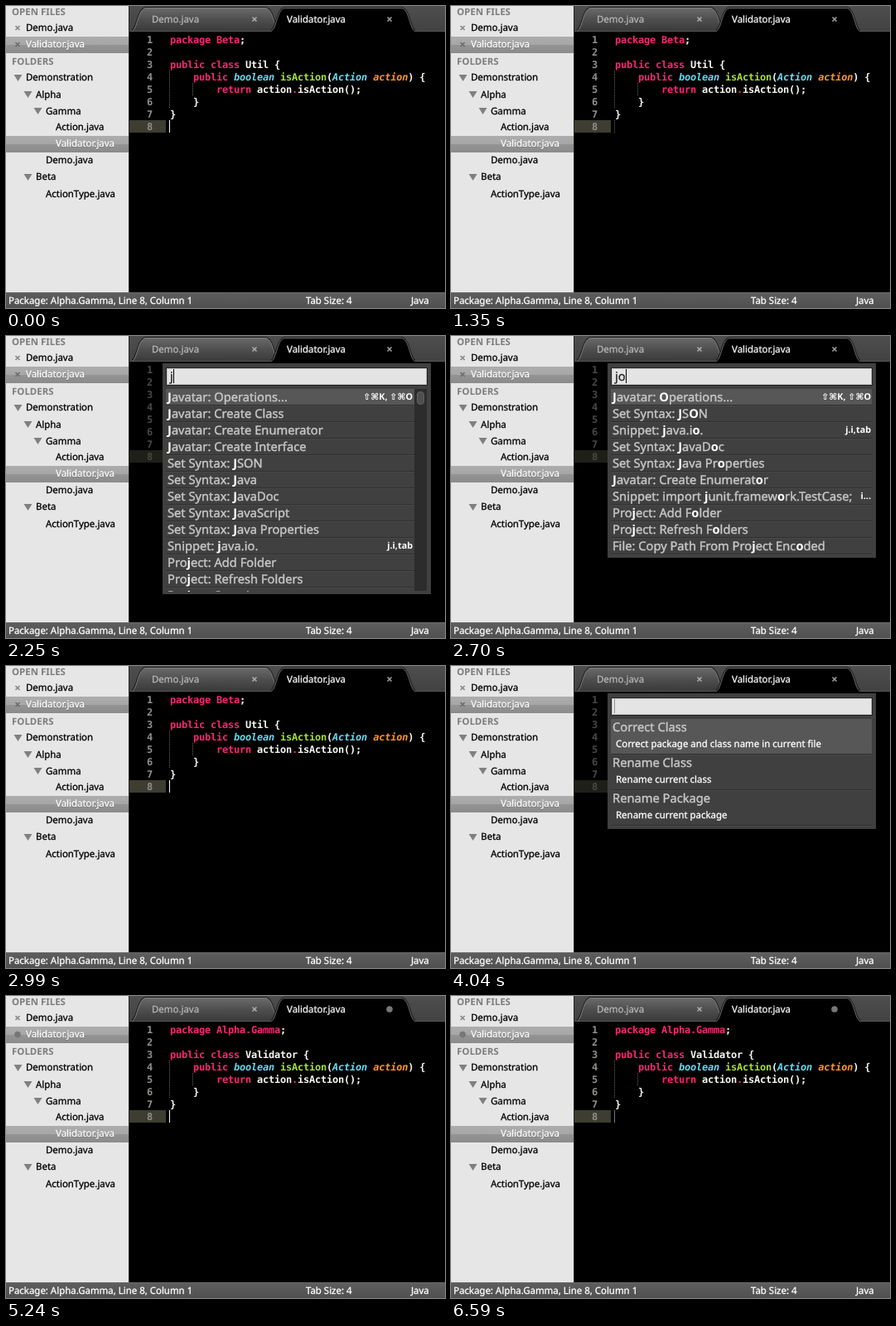
An HTML page that plays this animation: 530 by 365 pixels, repeating every 6.69 s.

```html
<!DOCTYPE html>
<html lang="en">
<head>
<meta charset="utf-8">
<title>Editor demo</title>
<style>
html, body { margin: 0; width: 100%; height: 100%; overflow: hidden; background: #000; }
svg { display: block; width: 530px; height: 365px; }
text { font-family: "Noto Sans", "DejaVu Sans", sans-serif; font-size: 11.45px; white-space: pre; text-rendering: geometricPrecision; stroke-width: .3px; }
.head { font-weight: bold; fill: #7d7d7d; }
.code, .num { font-family: "DejaVu Sans Mono", monospace; font-size: 12px; font-weight: bold; letter-spacing: -.224px; }
.code { fill: #f8f8f2; }
.k { fill: #f92672; }
.t { fill: #66d9ef; font-style: italic; }
.f { fill: #a6e22e; }
.a { fill: #fd971f; font-style: italic; }
.item { font-size: 14.7px; fill: #c8c8c8; stroke: #c8c8c8; stroke-width: .4px; }
.item .hit { font-weight: bold; fill: #fff; stroke: none; }
.keys { font-size: 10.8px; font-weight: bold; fill: #fff; text-anchor: end; }
.typed { font-size: 14.7px; fill: #222; stroke: #222; }
</style>
</head>
<body>
<svg id="stage" viewBox="0 0 530 365" xmlns="http://www.w3.org/2000/svg">
  <defs>
    <linearGradient id="bar" x2="0" y2="1"><stop stop-color="#4e4e4e"/><stop offset="1" stop-color="#424242"/></linearGradient>
    <linearGradient id="idle" x2="0" y2="1"><stop stop-color="#6a6a6a"/><stop offset=".5" stop-color="#4e4e4e"/><stop offset="1" stop-color="#3a3a3a"/></linearGradient>
    <linearGradient id="sel" x2="0" y2="1"><stop stop-color="#adadad"/><stop offset=".5" stop-color="#a6a6a6"/><stop offset=".5" stop-color="#949494"/><stop offset="1" stop-color="#8b8b8b"/></linearGradient>
    <linearGradient id="foot" x2="0" y2="1"><stop stop-color="#5e5e5e"/><stop offset="1" stop-color="#505050"/></linearGradient>
    <clipPath id="list"><rect x="193" y="64" width="315" height="245"/></clipPath>
  </defs>
  <g id="frame"></g>
  <g id="view"></g>
  <rect id="caret" width="1"/>
</svg>
<script>
const LOOP = 6690, DIM = .35;
// start time, scene, caret opacity
const STEPS = [
  [0, "before", 1], [300, "before", DIM], [450, "before", 0], [900, "before", DIM],
  [1050, "before", 1], [1200, "before", DIM], [1350, "before", 0],
  [1800, "all", 1], [2250, "j", 1], [2700, "jo", 1], [2990, "before", 1],
  [3140, "ops", 1], [3440, "ops", DIM], [3590, "ops", 0], [4040, "ops", DIM],
  [4190, "after", 1], [4640, "after", 0], [5240, "after", 1], [5540, "after", DIM],
  [5690, "after", 0], [6140, "after", DIM], [6290, "after", 1], [6590, "after", DIM]
];

const LISTS = {
  all: ["About", "Bookmarks: Clear All|⇧⌘F2", "Bookmarks: Select All", "Bookmarks: Select Next|F2",
    "Bookmarks: Select Previous|⇧F2", "Bookmarks: Toggle|⌘F2", "Build: Build|⌘B", "Build: Cancel|⌃C",
    "Code Folding: Fold Tag Attributes|⌘K, ⌘T", "Code Folding: Unfold All|⌘K, ⌘J",
    "Convert Case: Lower Case|⌘K, ⌘L", "Convert Case: Swap Case", "Convert Case: Title Case"],
  j: ["Javatar: Operations...|⇧⌘K, ⇧⌘O", "Javatar: Create Class", "Javatar: Create Enumerator",
    "Javatar: Create Interface", "Set Syntax: JSON", "Set Syntax: Java", "Set Syntax: JavaDoc",
    "Set Syntax: JavaScript", "Set Syntax: Java Properties", "Snippet: java.io.|j.i,tab",
    "Project: Add Folder", "Project: Refresh Folders", "Project: Save As"],
  jo: ["Javatar: Operations...|⇧⌘K, ⇧⌘O", "Set Syntax: JSON", "Snippet: java.io.|j.i,tab",
    "Set Syntax: JavaDoc", "Set Syntax: Java Properties", "Javatar: Create Enumerator",
    "Snippet: import junit.framework.TestCase;|i...", "Project: Add Folder",
    "Project: Refresh Folders", "File: Copy Path From Project Encoded"]
};
const OPS = [
  ["Correct Class", "Correct package and class name in current file"],
  ["Rename Class", "Rename current class"],
  ["Rename Package", "Rename current package"]
];

const $ = id => document.getElementById(id);
const text = (x, y, s, attr = "") => `<text x="${x}" y="${y}" ${attr}>${s}</text>`;
const label = (x, y, s, color) => text(x, y, s, `fill="${color}" stroke="${color}"`);
const rect = (x, y, w, h, fill, attr = "") =>
  `<rect x="${x}" y="${y}" width="${w}" height="${h}" fill="${fill}" ${attr}/>`;
const span = (cls, s) => `<tspan class="${cls}">${s}</tspan>`;
const cross = (x, y, color) =>
  `<path d="M${x - 2.5} ${y - 2.5}l5 5m0-5l-5 5" stroke="${color}" stroke-width="1.7"/>`;
const dot = (x, y, color) => `<circle cx="${x}" cy="${y}" r="3.8" fill="${color}"/>`;
const arrow = (x, y) => `<path d="M${x} ${y}h10l-5 8z" fill="#808080"/>`;

function tab(x, end, fill, edge) {
  const d = `M${x} 30.5C${x + 7} 28 ${x + 7} 3 ${x + 17} 2.5H${end - 17}C${end - 7} 3 ${end - 7} 28 ${end} 30.5`;
  return `<path d="${d}" fill="none" stroke="#1c1c1c" stroke-width="3"/>` +
    `<path d="${d}" fill="${fill}" stroke="${edge}"/>`;
}

function chrome() {
  const entry = (x, y, s) => label(x, y, s, "#000");
  const chosen = (x, y) => rect(0, y, 148, 20, "url(#sel)") +
    text(x, y + 14, "Validator.java", 'fill="#666"') + label(x, y + 13, "Validator.java", "#fff");
  return rect(0, 0, 530, 365, "#000") +
    rect(149, 0, 381, 30, "url(#bar)") +
    tab(152, 330, "url(#idle)", "#808080") + rect(149, 30, 381, 1, "#555") +
    tab(320, 494, "#000", "#6c6c6c") + rect(321, 30, 172, 3, "#000") +
    label(176, 20, "Demo.java", "#b4b4b4") + cross(300, 16, "#aaa") +
    label(339, 20, "Validator.java", "#f4f4f4") +
    rect(0, 0, 148, 346, "#e6e6e6") + rect(148, 0, 1, 346, "#222") +
    text(7, 11, "OPEN FILES", 'class="head"') + cross(14, 26.5, "#888") + entry(24, 30, "Demo.java") +
    chosen(24, 37) + text(7, 71, "FOLDERS", 'class="head"') +
    arrow(9.5, 83) + entry(24, 90, "Demonstration") +
    arrow(21.5, 103) + entry(36, 111, "Alpha") +
    arrow(33.5, 123) + entry(48, 131, "Gamma") +
    entry(60, 150, "Action.java") + chosen(60, 157) + entry(48, 190, "Demo.java") +
    arrow(21.5, 203) + entry(36, 210, "Beta") + entry(48, 231, "ActionType.java") +
    rect(0, 346, 530, 19, "url(#foot)") + rect(0, 346, 530, 1, "#6a6a6a") +
    label(3, 360, "Package: Alpha.Gamma, Line 8, Column 1", "#fff") +
    label(362, 360, "Tab Size: 4", "#fff") + label(489, 360, "Java", "#fff");
}

function gutter(dim) {
  let out = rect(149, 138, 44, 15, dim ? "#1f1f19" : "#3e3d32");
  for (let i = 1; i <= 8; i++)
    out += text(170, 30 + 15 * i, i, `class="num" fill="${dim ? "#484845" : "#8f908a"}"`);
  return out;
}

function code(pack, name) {
  const k = s => span("k", s);
  const lines = [
    k("package " + pack) + ";", "",
    k("public class") + ` ${name} {`,
    `    ${k("public")} ${span("t", "boolean")} ${span("f", "isAction")}(${span("t", "Action")} ${span("a", "action")}) {`,
    `        ${k("return")} action${k(".")}isAction();`,
    "    }", "}"
  ];
  const guide = (x, y, end) =>
    `<path d="M${x} ${y}V${end}" stroke="#666" stroke-dasharray="1 1"/>`;
  return gutter(false) + guide(197.5, 78, 123) + guide(225.5, 93, 108) + guide(197.5, 138, 153) +
    lines.map((s, i) => text(198, 45 + 15 * i, s, 'class="code"')).join("");
}

// Highlights the first in-order match of each typed letter.
function mark(s, query) {
  let n = 0;
  return [...s].map(c =>
    n < query.length && c.toLowerCase() === query[n] ? (n++, span("hit", c)) : c).join("");
}

function panel(height, query) {
  return gutter(true) + rect(189, 33, 324, height, "#404040") +
    rect(193.5, 38.5, 315, 21, "#e4e4e4", 'stroke="#222"') +
    rect(194.5, 39.5, 313, 19, "none", 'stroke="#c4c4c4"') +
    text(198, 54, query, 'class="typed" id="typed"');
}

function rule(y, w) {
  return rect(193, y, w, 1, "#303030") + rect(193, y + 1, w, 1, "#484848");
}

function palette(key) {
  const query = key === "all" ? "" : key, items = LISTS[key], long = items.length > 12;
  const w = long ? 300 : 315;
  let rows = rect(193, 64, w, 20, "#575757");
  items.forEach((item, i) => {
    const [title, keys] = item.split("|"), y = 64 + 20 * i;
    rows += rule(y + 19, w) + text(195, y + 15, mark(title, query), 'class="item"');
    if (keys) rows += text(long ? 491 : 507, y + 13, keys, 'class="keys"');
  });
  if (long) rows += rect(493, 64, 15, 244, "#2c2c2c") +
    rect(496.5, 67.5, 8, 15, "#4e4e4e", 'rx="3.5" stroke="#626262"');
  return panel(long ? 279 : 235, query) + `<g clip-path="url(#list)">${rows}</g>`;
}

function operations() {
  return panel(164, "") + rect(193, 64, 315, 43, "#575757") + OPS.map(([title, note], i) => {
    const y = 64 + 43 * i;
    return rule(y + 42, 315) + text(195, y + 15, title, 'class="item"') +
      label(199, y + 34, note, "#fff");
  }).join("");
}

function scene(name) {
  const edited = name === "after";
  const mode = edited ? dot(14, 46.5, "#777") + dot(463, 16, "#777")
    : cross(14, 46.5, "#6c6c6c") + cross(463, 16, "#999");
  if (name === "before") return mode + code("Beta", "Util");
  if (edited) return mode + code("Alpha.Gamma", "Validator");
  return mode + (name === "ops" ? operations() : palette(name));
}

let shown = "";
function render(ms) {
  const t = ms % LOOP;
  const [, name, alpha] = STEPS.findLast(s => s[0] <= t);
  const caret = $("caret");
  if (name !== shown) {
    $("view").innerHTML = scene(name);
    shown = name;
    const typed = $("typed");
    const x = typed && typed.textContent ? 198 + Math.round(typed.getComputedTextLength()) : 197;
    caret.setAttribute("x", x);
    caret.setAttribute("y", typed ? 40 : 138);
    caret.setAttribute("height", typed ? 17 : 15);
    caret.setAttribute("fill", typed ? "#000" : "#f8f8f0");
  }
  caret.setAttribute("opacity", alpha);
}

$("frame").innerHTML = chrome();
const start = performance.now();
function tick() {
  render(performance.now() - start);
  requestAnimationFrame(tick);
}
tick();
</script>
</body>
</html>
```
